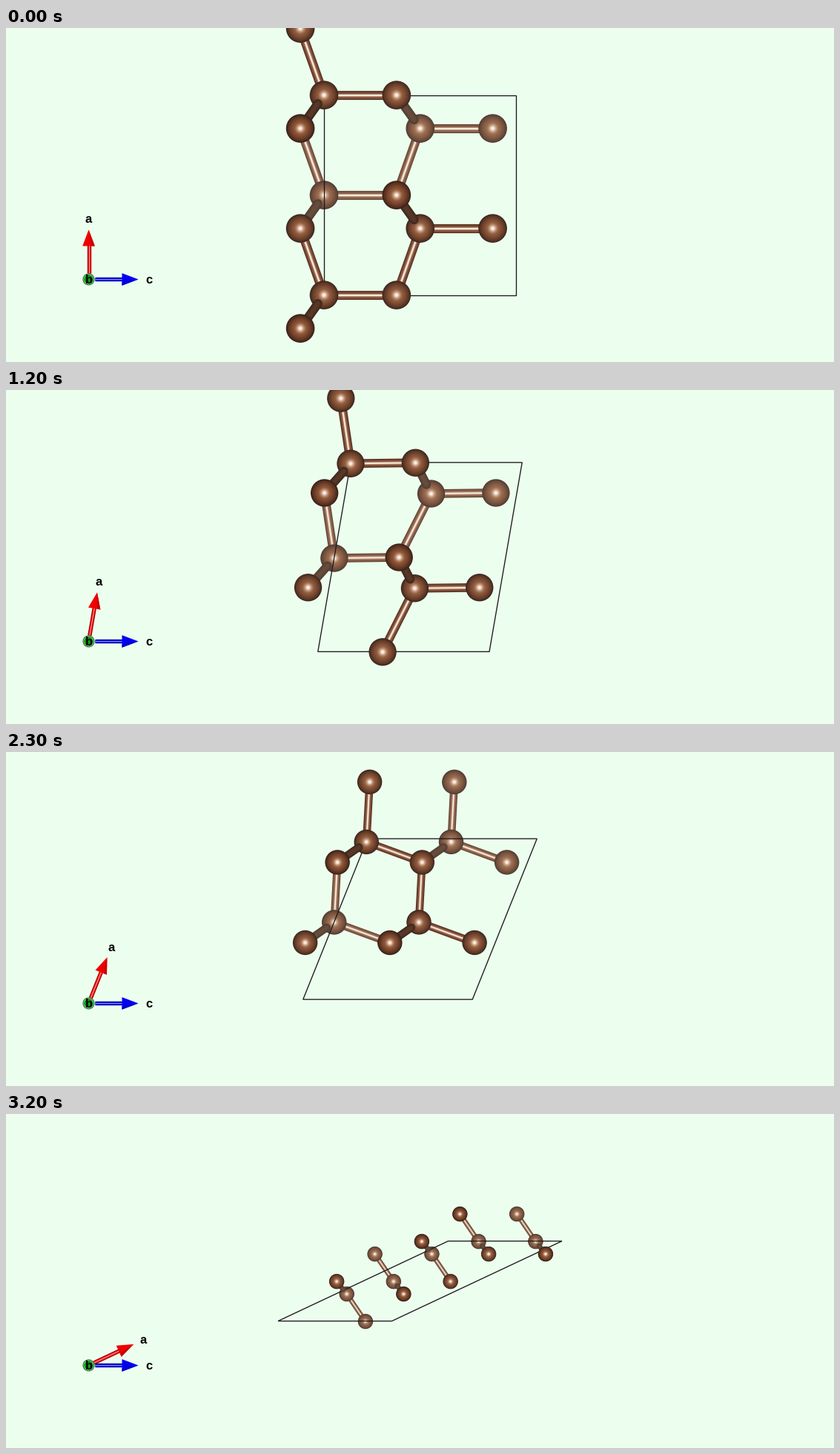
A matplotlib script for the animation above (3700 ms loop, 1117 px wide and 451 px high).

```python
import math
import numpy as np
import matplotlib.pyplot as plt
from matplotlib.animation import FuncAnimation
from matplotlib.collections import PatchCollection
from matplotlib.colors import LinearSegmentedColormap, to_rgb
from matplotlib.patches import Circle, Polygon

W, H, DPI = 1117, 451, 100
PX = 72 / DPI
BG = "#ecffee"
CENTER = (558.5, 225.6)
ORIGIN = np.array([111.5, 339.4])
LAST = 28

# Unit cell and atom radius at the turning points of the path
KEYS = [0, 5, 11, 15, 19, 25, LAST]
WIDTH = [259.5, 239.5, 223, 229.5, 228.5, 210.5, 153.5]
HEIGHT = [270, 264, 247, 230, 217, 196, 108]
SHEAR = [0, 27, 61.5, 73.5, 87, 121, 229.5]
RADIUS = [19.3, 19, 18.3, 17.3, 16.7, 16, 10.2]

# from, to, shift along c, half shift along a, tilted into depth
BONDS = [
    ("A", "D", 0, 0, False), ("A", "D", 0, -1, True), ("A", "B", 0, 0, False),
    ("B", "C", 0, 0, False), ("B", "C", 0, -2, False),
    ("B", "C", 0, -1, True), ("C", "D", 1, 0, False),
]
SHEET_BONDS = [
    ("A", "B", 0, 0, True), ("C", "D", 1, 0, True),
    ("D", "C", 0, -1, False), ("B", "A", 1, -1, False),
]


def atoms(text):
    """Each word is a site, its shift along c and its half shift along a."""
    return [(w[0], *map(int, w[1:].split(","))) for w in text.split()]


# first step, atoms drawn with all their neighbours, atoms far at the back
STAGES = [(start, atoms(full), atoms(back)) for start, full, back in (
    (0, "A0,2 A0,1 A0,0 C0,1 C0,0", "A0,1 C0,1 D1,1"),
    (1, "A0,2 A0,1 A0,0 C0,1 C0,0 D1,0 B0,0", "A0,1 B0,1 C0,1 D1,1"),
    (8, "A0,2 A0,1 C0,1 C0,0", "A0,1 B0,3 C0,1 D1,1"),
    (22, "A1,2 A1,1 B0,2 B0,1", "A0,1 A1,1 B0,1 B1,1 C0,-1"),
    (27, "A0,1 A0,2 D0,0 D0,1 C0,1",
     "A0,1 A0,2 B-1,2 C0,-1 C0,1 D0,0 D0,1 D0,2"),
)]

FOG = [0, .03, .13]
LINE_Z = 6.5
GLOSS = LinearSegmentedColormap.from_list("gloss", [
    (0, "#ffffff"), (.10, "#fbe9de"), (.26, "#bf8d70"), (.42, "#8f5a3b"),
    (.68, "#74422a"), (.88, "#54301f"), (1, "#38201a")])
RINGS = np.linspace(1, .04, 26)
ROD = [(1, "#4c2919"), (.84, "#6c3e28"), (.60, "#82503a"),
       (.34, "#b5866c"), (.17, "#fbe8dc")]
DARK_ROD = [(1, "#35201a"), (.8, "#45291b"), (.45, "#533120")]

fig = plt.figure(figsize=(W / DPI, H / DPI), dpi=DPI, facecolor=BG)
ax = fig.add_axes([0, 0, 1, 1])
ax.set_xlim(0, W)
ax.set_ylim(H, 0)
ax.axis("off")
live = []


def ramp(x, start, end):
    return min(max((x - start) / (end - start), 0), 1)


def sites(step):
    """Fractional coordinates (along c, along a) of the four sites."""
    drift = ramp(step, 19, 25)
    slip = ramp(step, 25, LAST)
    rise = .02 * ramp(step, 0, 15) ** 2 - .015 * slip
    offset = 1 / 3 + .01 * ramp(step, 0, 11) + .157 * ramp(step, 11, 15)
    au, av = .001 - .008 * drift + .282 * slip, -rise
    du, dv = -.122 + .006 * drift + .214 * slip, 1 / 3 + rise
    return {"A": (au, av), "B": (du + .5, dv - offset),
            "C": (au + .5, av + offset), "D": (du, dv)}


def neighbours(atom, rules):
    site, i, j = atom
    for a, b, di, dj, tilted in rules:
        if site == a:
            yield (b, i + di, j + dj), tilted
        if site == b:
            yield (a, i - di, j - dj), tilted


def fog(color, depth):
    t = FOG[depth]
    return np.array(to_rgb(color)) * (1 - t) + np.array(to_rgb(BG)) * t


def level(depth):
    return 10 - 2 * depth


def line(p, q, width, color, z, cap="butt"):
    live.extend(ax.plot([p[0], q[0]], [p[1], q[1]], color=color,
                        lw=width * PX, zorder=z, solid_capstyle=cap))


def patch(shape):
    live.append(ax.add_patch(shape))


def label(text, x, y):
    live.append(ax.text(x, y + 5.2, text, family="Liberation Sans",
                        weight="bold", size=12, ha="center", va="baseline",
                        zorder=30))


def sphere(p, r, depth):
    rings = PatchCollection(
        [Circle(p, r * s) for s in RINGS],
        facecolors=[fog(GLOSS(s)[:3], depth) for s in RINGS],
        edgecolors="none", zorder=level(depth))
    live.append(ax.add_collection(rings))


def rod(p, q, r, depth, tilted):
    """p is the farther end; a tilted rod leaves it through its front."""
    p, q = np.array(p), np.array(q)
    if tilted:
        p = p + (q - p) / math.dist(p, q) * r * .74
    z = level(depth) + (1 if tilted else -.5)
    for part, color in DARK_ROD if tilted else ROD:
        line(p, q, .63 * r * part, fog(color, depth), z,
             "round" if tilted else "butt")


def arrow(name, angle, edge, core, head, shade):
    d = np.array([math.sin(angle), -math.cos(angle)])
    n = np.array([-d[1], d[0]])
    for width, color in ((5.4, edge), (3.4, head), (1.3, core)):
        line(ORIGIN + 8 * d, ORIGIN + 46 * d, width, color, 20)
    tip, base = ORIGIN + 67 * d, ORIGIN + 45 * d
    for inner, color in ((-8.3, head), (4, shade)):
        patch(Polygon([tip, base + inner * n, base + 8.3 * n], fc=color,
                      ec="none", zorder=21))
    label(name, *(ORIGIN + 81.5 * d))


def compass(lean):
    arrow("a", lean, "#a00000", "#ff8c8c", "#f00000", "#c40000")
    arrow("c", math.pi / 2, "#000096", "#7f8cff", "#0000f0", "#0000c8")
    for r, color in ((8, "#0a5a14"), (7, "#d8f5da"), (6.4, "#0c9a1c")):
        patch(Circle(ORIGIN, r, fc=color, ec="none", zorder=22))
    label("b", *ORIGIN)


def draw(tick):
    while live:
        live.pop().remove()
    step = min(max(tick - 4, 0), LAST)
    width, height, shear, r = (
        float(np.interp(step, KEYS, row))
        for row in (WIDTH, HEIGHT, SHEAR, RADIUS))
    base = sites(step)
    _, full, back = [s for s in STAGES if s[0] <= step][-1]
    sheets = step >= STAGES[-1][0]
    rules = SHEET_BONDS if sheets else BONDS
    reach = math.inf if sheets else 5.2 * r

    def screen(u, v):
        return (CENTER[0] + (u - .5) * width + (v - .5) * shear,
                CENTER[1] - (v - .5) * height)

    def place(atom):
        site, i, j = atom
        u, v = base[site]
        return screen(u + i, v + j / 2)

    def bonded(atom):
        return [(other, tilted) for other, tilted in neighbours(atom, rules)
                if math.dist(place(atom), place(other)) < reach]

    def depth(atom):
        return 2 if atom in back else 1 - atom[2] % 2

    corners = [screen(*uv) for uv in ((0, 0), (1, 0), (1, 1), (0, 1))]
    patch(Polygon(corners, fill=False, ec="#1e1a1c", lw=1.35 * PX,
                  zorder=LINE_Z))

    shown = set(full)
    for atom in full:
        shown.update(other for other, _ in bonded(atom))
    for atom in sorted(shown):
        sphere(place(atom), r, depth(atom))
        for other, tilted in bonded(atom):
            if other in shown and atom < other:
                far, near = sorted((atom, other), key=depth, reverse=True)
                rod(place(far), place(near), r, depth(far), tilted)

    compass(math.atan2(shear, height))
    return live


anim = FuncAnimation(fig, draw, frames=37, interval=100, repeat=True,
                     repeat_delay=0, init_func=lambda: draw(0))
plt.show()
```
